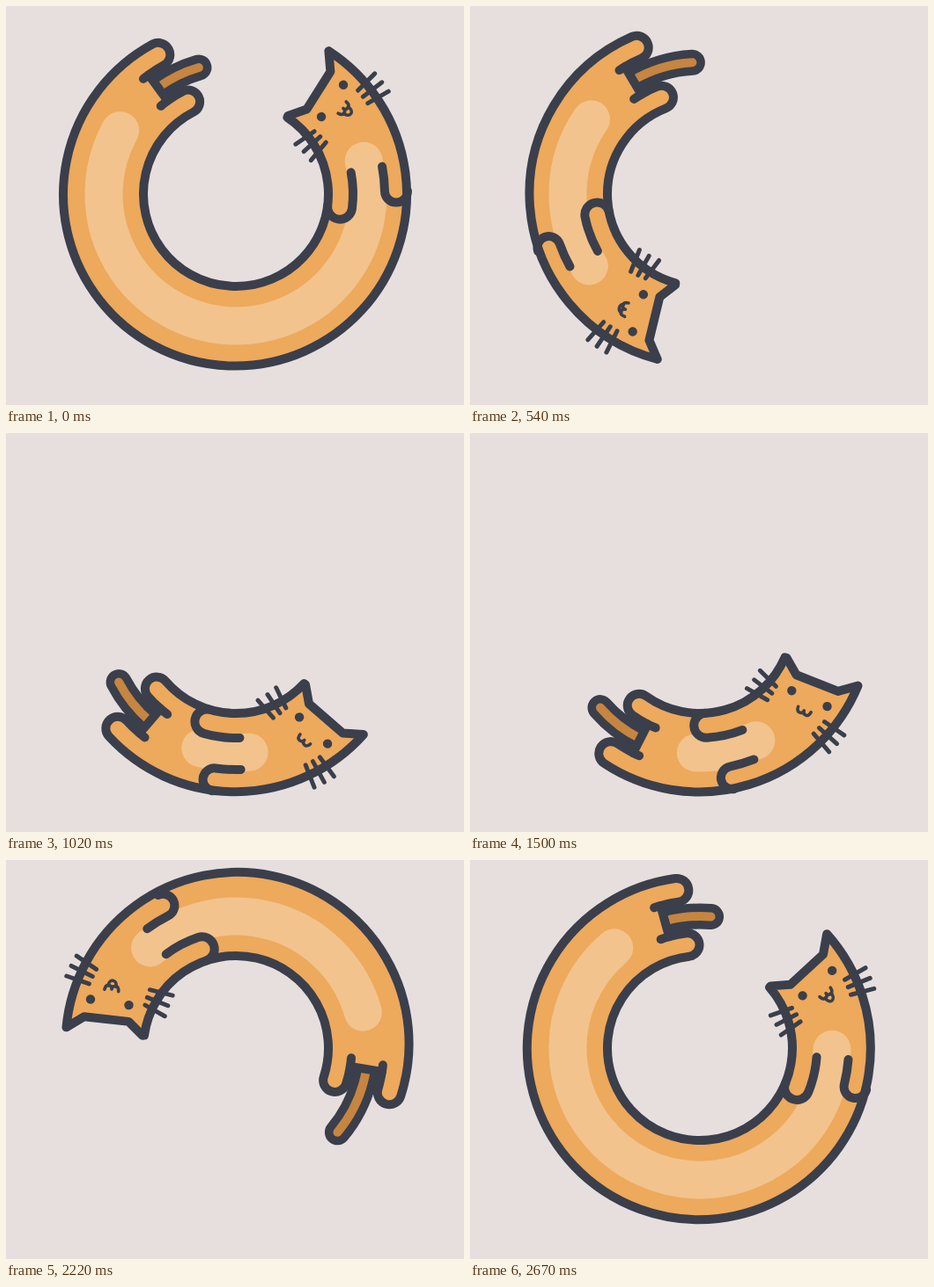
An HTML page that plays this animation: 520x454 px, repeating every 2.7 s.

```html
<!DOCTYPE html>
<html lang="en">
<head>
<meta charset="utf-8">
<title>Looping cat</title>
<style>
  html, body { margin: 0; width: 100%; height: 100%; overflow: hidden; background: #e7dfde; }
  svg { display: block; width: 100vw; height: 100vh; }
  path { fill: none; stroke: #3a3f4b; stroke-width: 10; stroke-linecap: round; stroke-linejoin: round; }
  #body { fill: #eda95c; }
  #shine { stroke: #f2c38d; stroke-width: 43; }
  #tail { stroke-width: 29; }
  #tailFill { stroke: #c68540; }
  #whiskers { stroke-width: 5; }
  #face path { stroke-width: 3.6; }
  circle { fill: #3a3f4b; }
</style>
</head>
<body>
<svg viewBox="0 0 520 454">
  <g transform="translate(261 214)">
    <path id="tail"/>
    <path id="tailFill"/>
    <path id="body"/>
    <path id="shine"/>
    <path id="legs"/>
    <g id="head">
      <path id="arms"/>
      <path id="whiskers"/>
      <g id="face" transform="translate(152.4 -5) rotate(-13.2)">
        <circle cx="-22" r="5.2"/>
        <circle cx="22" r="5.2"/>
        <path d="M-8 13.5Q-7.5 19 -4 19Q0 19 0 15Q0 19 4 19Q7.5 19 8 13.5"/>
        <path id="mouth"/>
      </g>
    </g>
  </g>
</svg>
<script>
const LOOP = 2700, STEP = 30;
const OUT = 195, IN = 105, MID = 150;

// Key poses: time, head angle, hip angle, tail reach; two turns per loop
const poses = [
  [0, -42.2, 243.9, 9.8],
  [540, -240.7, -110.4, 17.1],
  [1020, -303.4, -219.4, 11.8],
  [1500, -322.8, -233.2, 12.1],
  [1980, -424.2, -290.3, 18.2],
  [2220, -518.1, -340.8, 20.5],
  [2670, -747.1, -455.4, 10.2]
];

const $ = id => document.getElementById(id);
const draw = (id, d) => $(id).setAttribute('d', d);

// Pose value k at index i, continued past both ends of the loop
function key(i, k) {
  const n = poses.length, turn = Math.floor(i / n);
  const perLoop = [LOOP, -720, -720, 0][k];
  return poses[i - turn * n][k] + turn * perLoop;
}
const gap = i => key(i + 1, 0) - key(i, 0);
const rate = (i, k) => (key(i + 1, k) - key(i, k)) / gap(i);

// Monotone tangent: weighted harmonic mean of the neighbouring rates
function slope(i, k) {
  const a = rate(i - 1, k), b = rate(i, k);
  if (a * b <= 0) return 0;
  const wa = 2 * gap(i) + gap(i - 1), wb = gap(i) + 2 * gap(i - 1);
  return (wa + wb) / (wa / a + wb / b);
}

function pose(t) {
  let i = poses.length - 1;
  while (poses[i][0] > t) i--;
  const h = gap(i), s = (t - key(i, 0)) / h, q = 1 - s;
  return [1, 2, 3].map(k =>
    key(i, k) * (1 + 2 * s) * q * q + key(i + 1, k) * s * s * (3 - 2 * s) +
    h * s * q * (slope(i, k) * q - slope(i + 1, k) * s));
}

// Path pieces in polar coordinates
function pt(r, deg) {
  const a = deg * Math.PI / 180;
  return (r * Math.cos(a)).toFixed(2) + ' ' + (r * Math.sin(a)).toFixed(2);
}
const move = (r, a) => 'M' + pt(r, a);
const line = (r, a) => 'L' + pt(r, a);
const arc = (r, a, b) =>
  `A${r} ${r} 0 ${Math.abs(b - a) > 180 ? 1 : 0} ${b > a ? 1 : 0} ${pt(r, b)}`;
const cap = (size, sweep, r, a) => `A${size} ${size} 0 0 ${sweep} ${pt(r, a)}`;
const band = (r, a, b) => move(r, a) + arc(r, a, b);

function drawFixed() {
  draw('arms',
    band(133, 31.5, 49.3) + cap(14, 1, IN, 49.3) +
    band(169, 31.5, 41.2) + cap(13, 0, OUT, 41.2));
  let hairs = '';
  for (let i = 0; i < 3; i++) {
    hairs += move(182, 1.8 + 2.9 * i) + line(209, 1.2 + 3.5 * i);
    hairs += move(114 + 2 * i, 3.5 + 4.4 * i) + line(88.5 + 2.5 * i, 2.3 + 7.8 * i);
  }
  draw('whiskers', hairs);
}

function render(t) {
  const [head, hip, reach] = pose(t);
  const rump = hip - 10, outLeg = hip - 2.9, inLeg = hip - 1.1;

  draw('body',
    move(OUT - 1, head - 14.9) + arc(OUT, head - 14.9, outLeg) +
    cap(13.5, 1, 168, outLeg) + arc(168, outLeg, rump) +
    line(131.5, rump) + arc(131.5, rump, inLeg) +
    cap(13.25, 1, IN, inLeg) + arc(IN, inLeg, head - 14) +
    line(107, head - 14.2) + line(125.5, head - 8) + line(176, head - 10.2) + 'Z');
  draw('legs', band(168, hip - 12.6, rump) + band(131.5, hip - 14.3, rump));
  draw('shine', band(MID, head + 27.6, hip - 35));

  const tail = band(MID, rump, hip + reach);
  draw('tail', tail);
  draw('tailFill', tail);

  // The mouth opens wide in the fast half of the loop
  const open = 3.7 + 3.7 * Math.cos(2 * Math.PI * (t - 2550) / LOOP);
  const y = 18.5 + open * 4 / 3;
  draw('mouth', open > 1 ? `M-4.6 18.5C-4.6 ${y} 4.6 ${y} 4.6 18.5` : '');
  $('head').setAttribute('transform', `rotate(${head.toFixed(3)})`);
}

function tick() {
  const t = performance.now() % LOOP;
  render(Math.floor(t / STEP) * STEP);
  requestAnimationFrame(tick);
}

drawFixed();
tick();
</script>
</body>
</html>
```
